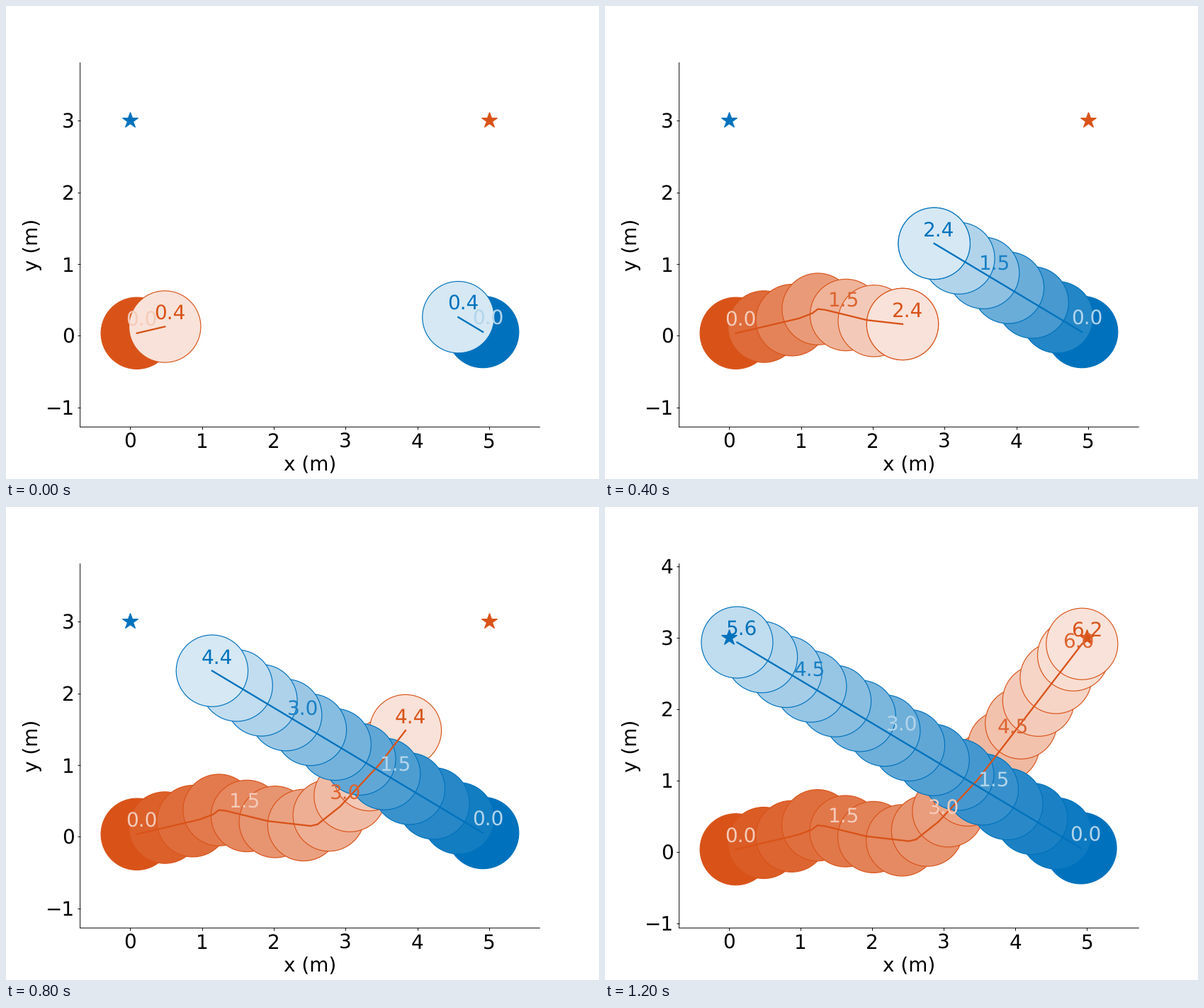
Write a matplotlib script that moves like this. It is 837 by 669 pixels and loops after 2.2 s.

```python
import numpy as np
import matplotlib.pyplot as plt
from matplotlib.animation import FuncAnimation
from matplotlib.ticker import MultipleLocator

DPI = 83.7
RADIUS = 0.5
STEP = 0.1            # simulation step in s, at a speed of 1 m/s
ARRIVED = 0.17        # distance at which an agent stops
CIRCLE_GAP = 0.4      # time between drawn discs, s
LABEL_GAP = 1.5       # time between drawn labels, s
FADE = 1.2
LAST = 12             # final picture, held until the loop ends
FRAMES = 22

plt.rcParams.update({
    "font.family": "DejaVu Sans",
    "font.size": 24,
    "text.hinting": "none",
    "path.snap": False,
})

# orange steers around blue: (steps, heading in degrees)
DETOUR = [(1, 20), (9, 13.2), (2, 21), (1, 37), (1, -6.5), (6, -13.8),
          (6, -6.5), (1, 13.3), (4, 38.5), (8, 47)]


def walk(start, goal, detour):
    """Follow the detour, then head straight for the goal."""
    pos, goal = np.array(start, float), np.array(goal)
    turns = [np.radians(deg) for steps, deg in detour for _ in range(steps)]
    path = []
    while np.hypot(*(goal - pos)) > ARRIVED:
        dx, dy = goal - pos
        angle = turns.pop(0) if turns else np.arctan2(dy, dx)
        pos = pos + STEP * np.array([np.cos(angle), np.sin(angle)])
        path.append(pos)
    return np.array(path)


def agent(color, start, goal, detour=()):
    xy = walk(start, goal, detour)
    t = np.cumsum(np.full(len(xy), STEP)) - STEP
    return dict(color=np.array(color) / 255, goal=goal, t=t, xy=xy)


AGENTS = [
    agent((217, 83, 25), (0, 0), (5, 3), DETOUR),
    agent((0, 114, 189), (5, 0), (0, 3)),
]


def tint(color, alpha):
    return alpha * color + 1 - alpha


def draw_agent(a, n, t_max):
    last = min(n, len(a["t"]) - 1)
    t, xy, color = a["t"], a["xy"], a["color"]

    def strength(i):
        return 1 - t[i] / (FADE * t_max)

    def marks(gap):
        return [round(s / STEP) for s in np.arange(0, t[last], gap)]

    def disc(i):
        ax.add_patch(plt.Circle(xy[i], RADIUS, ec=color,
                                fc=tint(color, strength(i))))

    def label(i, shade):
        ax.text(xy[i, 0] - 0.15, xy[i, 1] + 0.1, f"{t[i]:.1f}", color=shade)

    ax.plot(*xy[:last + 1].T, color=color, lw=2)
    ax.plot(*a["goal"], marker="*", ms=20, color=color)
    for i in marks(CIRCLE_GAP):
        disc(i)
    for i in marks(LABEL_GAP):
        label(i, tint(color, 0.3 if strength(i) > 0.5 else 0.9))
    disc(last)
    label(last, color)


def draw(frame):
    ax.clear()
    n = 4 + 5 * min(frame, LAST)
    t_max = max(a["t"][min(n, len(a["t"]) - 1)] for a in AGENTS)
    for a in AGENTS:
        draw_agent(a, n, t_max)
    ax.set_xlabel("x (m)")
    ax.set_ylabel("y (m)")
    ax.spines[["top", "right"]].set_visible(False)
    for axis in (ax.xaxis, ax.yaxis):
        axis.set_major_locator(MultipleLocator(1))
    ax.axis("equal")
    return []


# the tiny surplus keeps the pixel size from rounding down
fig, ax = plt.subplots(figsize=((837 + 1e-6) / DPI, (669 + 1e-6) / DPI), dpi=DPI)
anim = FuncAnimation(fig, draw, frames=FRAMES, init_func=lambda: draw(0),
                     interval=100, repeat=True, repeat_delay=0, blit=False)
plt.show()
```
